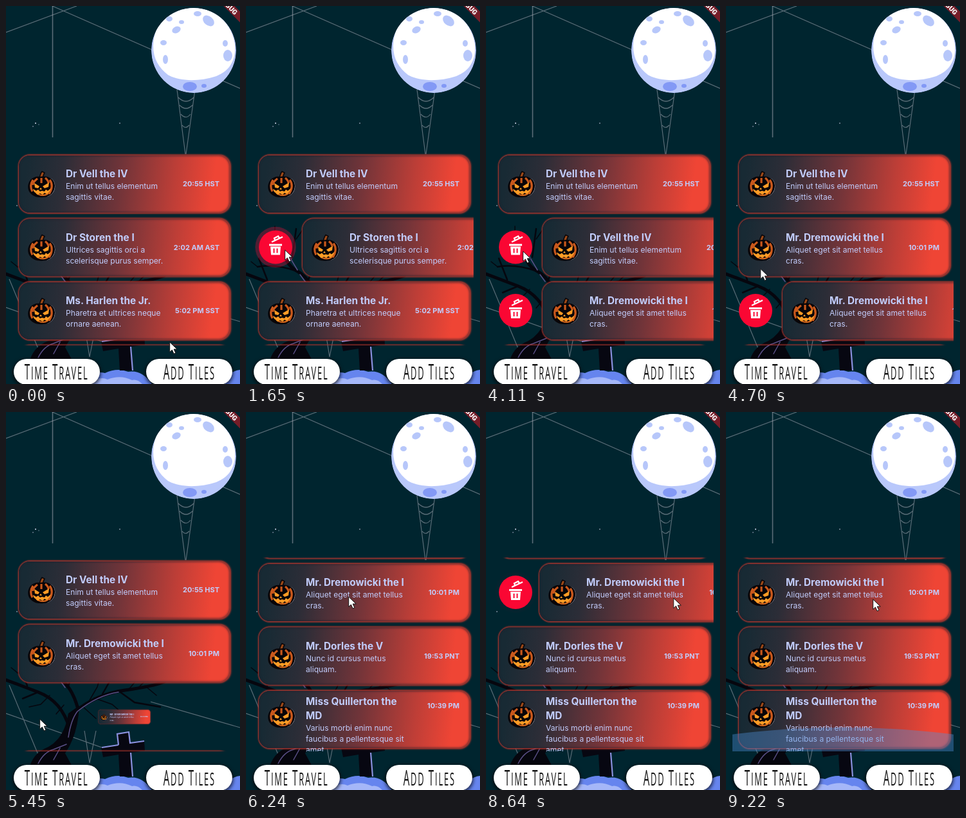
These frames come from a looping animation (364x587 px, 9.24 s). An HTML page:

```html
<!DOCTYPE html>
<html lang="en">
<head>
<meta charset="utf-8">
<title>Halloween tiles</title>
<style>
html, body { margin: 0; width: 100%; height: 100%; overflow: hidden; background: #00252f; }
#stage { position: relative; width: 364px; height: 587px; overflow: hidden; font-family: Inter, sans-serif; color: #c1ccfb; }
#stage > svg, .row, .tile, .tile > *, .trash, .trash > *, #list, #glow, .pill, #cursor { position: absolute; }
#list { left: 10px; top: 226px; width: 344px; height: 301px; overflow: hidden; }
.row { left: 0; top: 0; width: 344px; height: 98px; }
.tile {
  left: 10px; top: 6px; width: 328px; height: 89px; border-radius: 17px;
  background: linear-gradient(97deg, #182a34 4%, #2c2d37 21%, #713439 48%, #bd3e37 73%, #ef4535 91%);
  box-shadow: inset 0 0 3px 1px #27202b99, 0 0 2px 1px #ac352f, 1px 0 3px 1px #b8392f;
}
.tile span { left: 73px; white-space: nowrap; line-height: 22px; }
.tile .name { font-size: 15.4px; font-weight: 700; }
.tile .text { font-size: 12.1px; line-height: 17px; }
.tile .time { left: auto; right: 16px; font-size: 11px; font-weight: 700; }
.tile svg { left: 13px; width: 46px; height: 44px; }
.trash { left: 10px; top: 23.5px; width: 52px; height: 52px; }
.trash > * { inset: 0; border-radius: 50%; }
.halo { background: #f1113c; }
.disc { background: #fa0733; }
.disc svg { width: 52px; height: 52px; }
#glow { left: 0; bottom: 0; width: 344px; height: 37px; background: #4f8fd666; clip-path: ellipse(560px 220px at 50% 220px); }
.pill {
  top: 548px; width: 134px; height: 40px; border-radius: 20px; background: #fff; color: #111;
  box-shadow: 0 2px 5px 2px #0009; display: flex; align-items: center; justify-content: center;
}
.pill b { font: 400 28px/40px "Open Sans", sans-serif; letter-spacing: 4px; white-space: nowrap; transform: scaleX(.46); }
.pill i { display: inline-block; font-style: normal; }
.pill i::first-letter { font-size: 33px; }
</style>
</head>
<body>
<div id="stage">
<svg width="364" height="587" viewBox="0 0 364 587">
  <defs>
    <symbol id="pumpkin" viewBox="0 0 46 44">
      <path d="M19 13Q20 6 23 2l4 2q-3 5-2 9z" fill="#9a4818" stroke="#080508" stroke-width="1.500"/>
      <path d="M30 11c17 0 18 25 1 30z" fill="#dfe2f6"/>
      <path d="M21 10C5 8-1 21 2 31c4 10 15 12 23 11 11 0 18-8 18-18 0-10-10-16-22-14z" fill="#080508"/>
      <path d="M9 15Q3 24 8 33M16 13Q9 18 9 23M22 12v8M28 12q5 4 5 8M35 15q7 9-1 22" fill="none" stroke="#c9581c" stroke-width="3.200"/>
      <path d="M12 34q13 8 24-1-3 7-11 7-9 0-13-6z" fill="#d8681c"/>
      <path d="M11 20l8 5-2 3-5-1zM34 19l-10 6 3 3 6-2zM21 27l2 3h-4zM9 29l5 3 3-2 3 3 3-1 4 1 2-3 3 2 5-4q-3 8-7 9l-3-2-3 3-4-2-4 2-3-3q-3-1-4-6z" fill="#ff9c25"/>
    </symbol>
    <symbol id="bin" viewBox="0 0 52 52">
      <path d="M16 21h20v3H16zM18 25h16l-1 13H19z" fill="#fff"/>
      <path d="M23.500 28v7M28.500 28v7" stroke="#fa0733" stroke-width="2"/>
      <path d="M20 18l17-8M25 15l-1-3 6-3 2 3" fill="none" stroke="#fff" stroke-width="2.300"/>
    </symbol>
    <clipPath id="moon"><circle cx="292" cy="69" r="66"/></clipPath>
  </defs>
  <g fill="none" stroke="#a7a8b2" stroke-opacity=".55" stroke-width="1.200">
    <path d="M72.500 0v204" stroke-width="1.600"/>
    <path d="M0 41L110 0M72 0L364 128"/>
    <path d="M5 424L58 551M0 468L180 532M122 495l8 50 10-50M225 450l139 40"/>
    <path d="M266 130l13 100M294 130l-14 100M268 142q12 12 24 0M270 154q10 10 20 0M272 168q8 9 15 0M274 185q5 7 11 0"/>
  </g>
  <g fill="#d7dcf1"><circle cx="46" cy="182" r="1"/><circle cx="42" cy="187" r=".7"/><circle cx="51" cy="184" r=".6"/><circle cx="177" cy="182" r=".8"/><circle cx="17" cy="310" r=".8"/></g>
  <g clip-path="url(#moon)">
    <circle cx="292" cy="69" r="66" fill="#b9c8fb"/>
    <path d="M229 62C231 15 263 3 292 3c42 0 67 36 64 69-3 22-15 31-29 37-28 9-58 8-75-2-14-11-23-25-23-45z" fill="#fff"/>
    <g fill="#b7c7fa">
      <ellipse cx="254" cy="20" rx="5" ry="4"/><ellipse cx="265" cy="37" rx="7" ry="5" transform="rotate(-25 265 37)"/>
      <ellipse cx="273" cy="25" rx="4" ry="3"/><ellipse cx="298" cy="12" rx="6" ry="4"/>
      <ellipse cx="315" cy="23" rx="10" ry="7" transform="rotate(40 315 23)"/>
      <ellipse cx="245" cy="57" rx="5" ry="4"/><ellipse cx="345" cy="77" rx="7" ry="9"/>
      <ellipse cx="341" cy="58" rx="4" ry="5"/><ellipse cx="248" cy="83" rx="4" ry="7"/>
    </g>
    <g fill="#8399f5"><ellipse cx="286" cy="125" rx="11" ry="7"/><ellipse cx="308" cy="124" rx="4" ry="3"/></g>
  </g>
  <g stroke-linecap="round" fill="none">
    <path d="M36 556q4-26 30-36 25-14 31-52l17-12q-2 45-22 74l14 26z" fill="#06060e"/>
    <g stroke="#06060e">
      <path d="M99 492Q87 449 50 435T0 416M112 461Q102 424 80 412T58 371M108 465Q141 438 185 432T246 419" stroke-width="5"/>
      <path d="M80 412Q46 400 18 405M72 390l6-44M59 371L36 352M50 435l-24 10M150 438l24-42 25-9M175 433l25 18 40 7M96 427l18-42M33 425L20 392" stroke-width="2.500"/>
      <path d="M78 362l14-20M190 432l28-34M216 425l18 15M175 397l-12-13M18 405L8 397M45 359V342M113 393l24-16M128 451l14-24 4-14M137 444l28 10 14 12M206 428l12-12 22-4M68 440l-14 14-18 4M90 455l-12 14M120 458l20 18" stroke-width="1.500"/>
    </g>
    <path d="M97 505q4-27 14-40 31-25 64-30M50 546q9-18 24-22l20-8M80 410l-15-25M92 428l-8-11M84 522l-10 18" stroke="#5a4f86" stroke-width="1.500"/>
  </g>
  <path d="M118 587q15-22 36-17 19-9 36-2 21-4 37 19zM340 587q5-20 24-22v22z" fill="#6685ee"/>
  <path d="M130 587q14-13 28-7 20-8 38 1 8-2 16 6z" fill="#a5b7f8"/>
  <path d="M173 500l18-3 2 17 22-3 1 15-22 3 3 37h-20l-2-34-24 4-3-15 26-4z" fill="#070711"/>
  <path d="M175 517l-2-17 18-3 2 17 22-3M149 521l26-4M194 529l3 37" fill="none" stroke="#8b91df" stroke-width="2.200"/>
  <g transform="translate(351 4) rotate(45)">
    <path d="M-60-6h120V6H-60z" fill="#751d28"/>
    <text x="-23" y="4" font-family="Roboto, sans-serif" font-size="10.500" font-weight="900" fill="#fff">DEBUG</text>
  </g>
</svg>
<div id="list"><div id="glow"></div></div>
<div class="pill" style="left:12px"><b><i>TIME</i> <i>TRAVEL</i></b></div>
<div class="pill" style="left:218px"><b><i>ADD</i> <i>TILES</i></b></div>
<svg id="cursor" width="14" height="21" viewBox="0 0 14 21"><path d="M.7 1v15.500l3.700-3.400 2.700 6 2.800-1.200-2.700-5.900h5z" fill="#fff" stroke="#111" stroke-width="1"/></svg>
</div>
<script>
const LOOP = 9240, PITCH = 98.5, SHRINK = 280, HALO = 750, SLIDE = 68;
const list = document.getElementById('list');
const glow = document.getElementById('glow');
const cursor = document.getElementById('cursor');

const clamp = v => Math.min(1, Math.max(0, v));
const ease = p => p * p * (3 - 2 * p);

// Value of a [time, value] track, eased between points.
function at(track, t) {
  const i = track.findIndex(k => k[0] > t);
  if (i < 0) return track[track.length - 1][1];
  if (!i) return track[0][1];
  const [a, va] = track[i - 1], [b, vb] = track[i];
  return va + (vb - va) * ease((t - a) / (b - a));
}

const vell = { name: ['Dr Vell the IV'], text: ['Enim ut tellus elementum', 'sagittis vitae.'], time: '20:55 HST' };
const drem = { name: ['Mr. Dremowicki the I'], text: ['Aliquet eget sit amet tellus', 'cras.'], time: '10:01 PM' };

const items = [
  { ...vell },
  { name: ['Dr Storen the I'], text: ['Ultrices sagittis orci a', 'scelerisque purus semper.'], time: '2:02 AM AST',
    slide: [[700, 0], [950, 1]], pop: 1100, cut: 1950 },
  { name: ['Ms. Harlen the Jr.'], text: ['Pharetra et ultrices neque', 'ornare aenean.'], time: '5:02 PM SST',
    slide: [[2480, 0], [2780, 1]], pop: 2860, cut: 3820 },
  { ...vell, slide: [[2960, 0], [3200, 1]], pop: 3280, cut: 4240 },
  { ...drem, slide: [[4100, 0], [4100, 1], [4520, 1], [4520, 0], [7600, 0], [7840, 1], [8600, 1], [8850, 0]], pop: 7900, shown: [4100, 4520] },
  { ...drem, slide: [[4520, 0], [4520, 1]], pop: 3000, cut: 5240 },
  { name: ['Mr. Dorles the V'], text: ['Nunc id cursus metus', 'aliquam.'], time: '19:53 PNT',
    slide: [[7250, 0], [7480, 1], [8250, 1], [8450, 0]], pop: 7500 },
  { name: ['Miss Quillerton the', 'MD'], text: ['Varius morbi enim nunc', 'faucibus a pellentesque sit', 'amet.'], time: '10:39 PM' }
];

const scroll = [[5800, 0], [6150, 94.5]];
const glowTrack = [[6260, 0], [6420, .6], [6750, 0], [7600, 0], [7760, .3], [8050, 0], [8960, 0], [9200, 1]];
const path = [
  [0, 254, 521], [40, 254, 521], [450, 190, 372], [700, 190, 372], [950, 262, 372], [1500, 60, 378],
  [2230, 60, 378], [2480, 160, 372], [2780, 228, 372], [2960, 150, 472], [3200, 218, 472], [3700, 57, 380],
  [4520, 57, 380], [4780, 52, 415], [5070, 52, 476], [5520, 52, 476], [5800, 150, 382], [6150, 159, 287],
  [6240, 159, 286], [6500, 160, 262], [7050, 180, 375], [7250, 180, 375], [7480, 260, 375], [7600, 252, 278],
  [7840, 321, 276], [7960, 321, 276], [8250, 262, 375], [8450, 190, 375], [8600, 296, 288], [8850, 228, 290]
];
const pathX = path.map(p => [p[0], p[1]]), pathY = path.map(p => [p[0], p[2]]);

function build(item) {
  const tall = item.name.length > 1;
  const span = (cls, top) => (s, i) => `<span class="${cls}" style="top:${top + i * (cls === 'name' ? 22 : 17)}px">${s}</span>`;
  const row = document.createElement('div');
  row.className = 'row';
  row.innerHTML = `<div class="trash"><div class="halo"></div><div class="disc"><svg><use href="#bin"/></svg></div></div>
    <div class="tile"><svg style="top:${tall ? 15 : 23}px"><use href="#pumpkin"/></svg>
    ${item.name.map(span('name', tall ? 5.5 : 17.5)).join('')}
    ${item.text.map(span('text', tall ? 48.5 : 38.5)).join('')}
    ${span('time', tall ? 12 : 33)(item.time, 0)}</div>`;
  list.insertBefore(row, glow);
  Object.assign(item, { row, tile: row.querySelector('.tile'), trash: row.querySelector('.trash'), halo: row.querySelector('.halo') });
}
items.forEach(build);

function draw(t) {
  let slot = 0;
  const offset = at(scroll, t);
  for (const it of items) {
    const gone = it.cut && t >= it.cut + SHRINK;
    it.row.style.display = gone ? 'none' : '';
    if (gone) continue;
    const cutting = it.cut && t >= it.cut;
    const slide = it.slide && !cutting ? at(it.slide, t) : 0;
    const scale = cutting ? 1 - (t - it.cut) / SHRINK : 1;
    it.row.style.transform = `translateY(${slot++ * PITCH - offset}px)`;
    it.tile.style.transform = `translateX(${slide * SLIDE}px) scale(${scale})`;

    const held = it.shown && t >= it.shown[0] && t < it.shown[1];
    const pop = held ? 1 : it.pop && slide ? ease(clamp((t - it.pop) / 180)) * clamp(slide * 1.5) : 0;
    const p = clamp((t - it.pop) / HALO);
    it.trash.style.transform = `scale(${pop})`;
    it.halo.style.transform = `scale(${1 + .24 * Math.sin(p * Math.PI / 2)})`;
    it.halo.style.opacity = .45 * Math.sin(p * Math.PI);
  }
  const g = at(glowTrack, t);
  glow.style.opacity = g;
  glow.style.transform = `translateY(${(1 - g) * 12}px)`;
  cursor.style.transform = `translate(${at(pathX, t)}px, ${at(pathY, t)}px)`;
}

const start = performance.now();
function tick(now) {
  draw(Math.max(0, now - start) % LOOP);
  requestAnimationFrame(tick);
}
draw(0);
requestAnimationFrame(tick);
</script>
</body>
</html>
```
